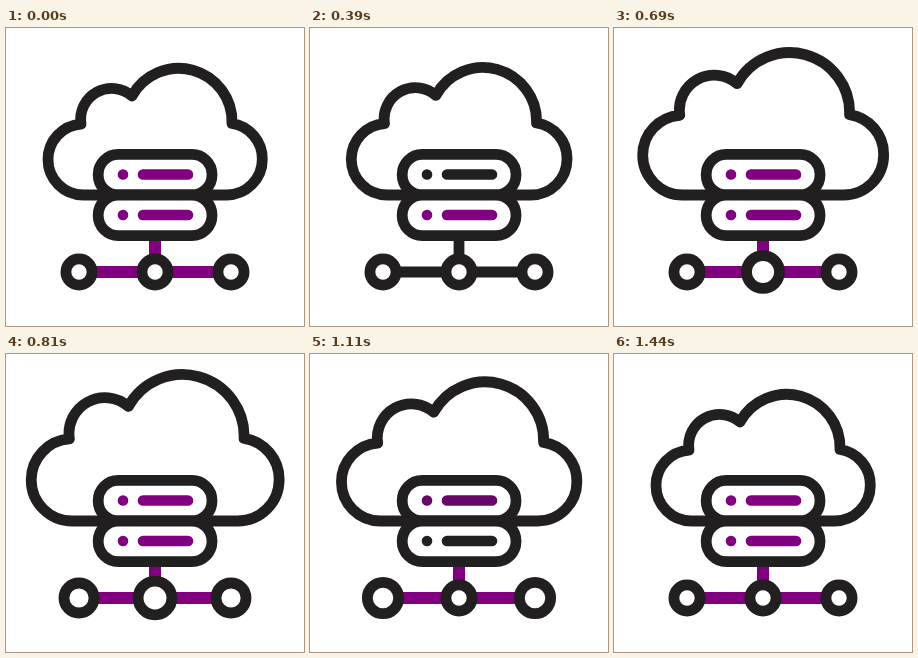
These frames come from a looping animation (298 px wide and 298 px high, 1500 ms). An HTML page:

```html
<!DOCTYPE html>
<html lang="en">
<head>
<meta charset="utf-8">
<title>Cloud server</title>
<style>
  html, body { margin: 0; width: 100%; height: 100%; overflow: hidden; background: #fff; }
  svg { display: block; width: 100vw; height: 100vh; }
  /* line weight stays constant while a group is scaled by --k */
  .ink { stroke: #221f20; stroke-width: calc(10.8px / var(--k, 1)); fill: #fff; }
  .link { stroke: #800080; stroke-width: 12; }
</style>
</head>
<body>
<svg viewBox="0 0 298 298" fill="none" stroke-linecap="round" stroke-linejoin="round">
  <g id="cloud">
    <path class="ink" d="M77.5 167A35.5 35.5 0 0 1 42 131.5A35.5 35.5 0 0 1 75 96.1A31 31 0 0 1 126 68A53.3 53.3 0 0 1 226 95.5A35.7 35.7 0 0 1 256.3 131.3A35.7 35.7 0 0 1 220.6 167Z"/>
  </g>
  <path class="ink" d="M149 207V244M73 244H225"/>
  <path class="link" id="stem"/>
  <path class="link" id="wire"/>
  <rect class="ink" x="92.2" y="126.4" width="113.8" height="40.6" rx="20"/>
  <rect class="ink" x="92.2" y="167" width="113.8" height="40.6" rx="20"/>
  <g id="top" stroke-width="10.6"><path d="M117 146.5h.01M137 146.5H182"/></g>
  <g id="bottom" stroke-width="10.6"><path d="M117 187h.01M137 187H182"/></g>
  <g id="left"><circle class="ink" cx="73" cy="244" r="13.1"/></g>
  <g id="mid"><circle class="ink" cx="149" cy="244" r="13.1"/></g>
  <g id="right"><circle class="ink" cx="225" cy="244" r="13.1"/></g>
</svg>
<script>
const LOOP = 1500;
const DARK = [34, 31, 32], PURPLE = [128, 0, 128];
const el = id => document.getElementById(id);

// Eased 0..1 between times a and b
function ease(t, a, b) {
  const u = Math.min(1, Math.max(0, (t - a) / (b - a)));
  return (1 - Math.cos(Math.PI * u)) / 2;
}

// Rises from a to b, falls from c to d
const pulse = (t, a, b, c, d) => ease(t, a, b) - ease(t, c, d);

function scale(id, k, x, y) {
  const node = el(id);
  node.setAttribute('transform', `translate(${x} ${y}) scale(${k}) translate(${-x} ${-y})`);
  node.style.setProperty('--k', k);
}

function tint(id, dark) {
  const rgb = PURPLE.map((p, i) => Math.round(p + (DARK[i] - p) * dark));
  el(id).setAttribute('stroke', `rgb(${rgb})`);
}

function draw(t) {
  scale('cloud', 1 + 0.16 * pulse(t, 320, 860, 890, 1410), 149, 167);

  const mid = 1 + 0.29 * pulse(t, 480, 750, 800, 1070);
  const side = 1 + 0.29 * pulse(t, 690, 930, 1010, 1270);
  scale('mid', mid, 149, 244);
  scale('left', side, 73, 244);
  scale('right', side, 225, 244);

  const flow = 1 - pulse(t, 60, 330, 455, 720);
  const reach = 76 * flow;
  el('stem').setAttribute('d', `M149 244V${244 - 37 * Math.min(1, 1.6 * flow)}`);
  el('wire').setAttribute('d', `M${149 - reach} 244H${149 + reach}`);

  tint('top', pulse(t, 240, 360, 420, 550) + pulse(t, 850, 970, 1020, 1160));
  tint('bottom', pulse(t, 400, 510, 560, 700) + pulse(t, 870, 995, 1195, 1330));
}

function tick() {
  draw(performance.now() % LOOP);
  requestAnimationFrame(tick);
}
tick();
</script>
</body>
</html>
```
